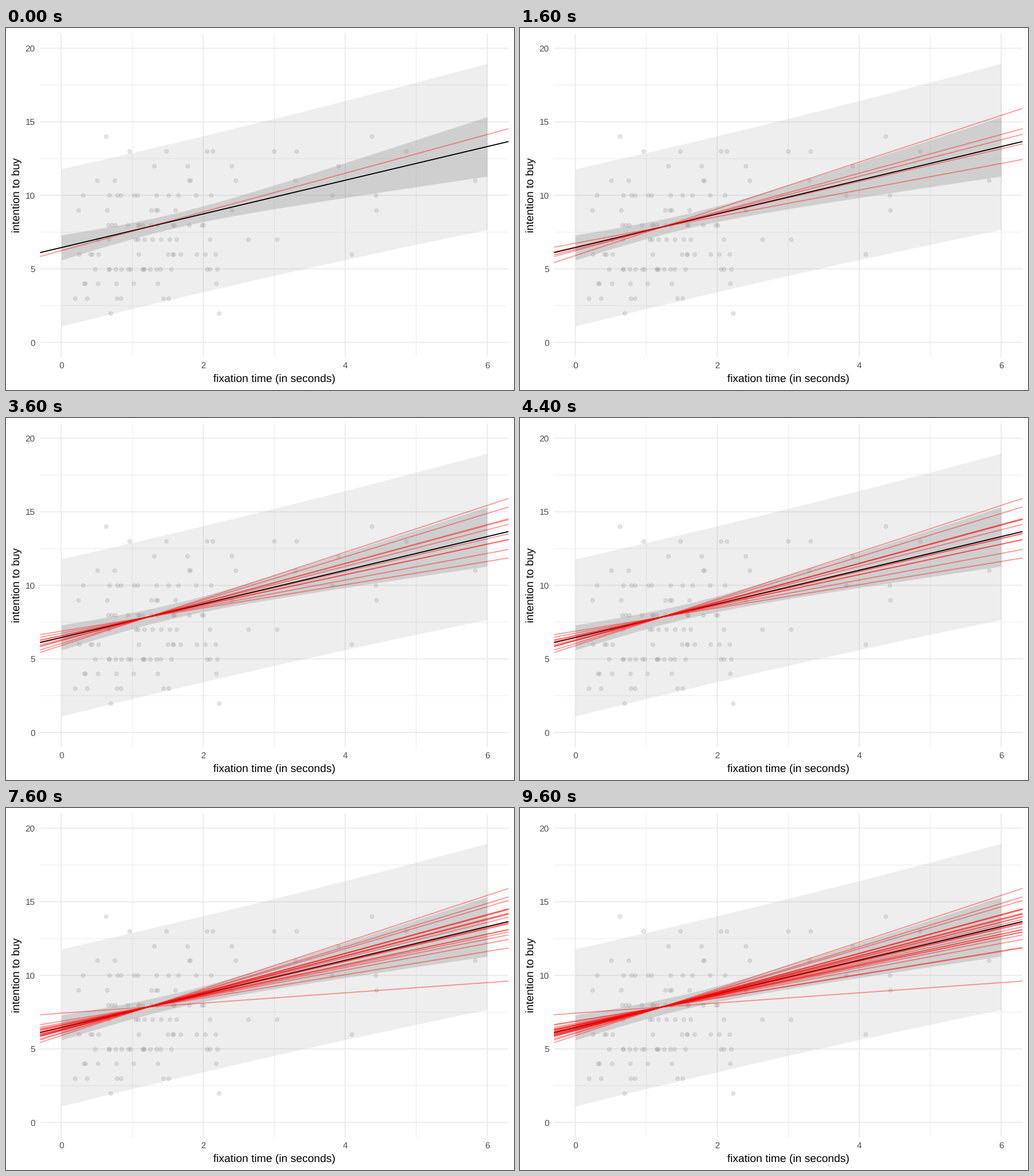
Recreate the animation shown at these times as a matplotlib script. Size 885x632 px, loop 10000 ms.

```python
import numpy as np
import matplotlib.pyplot as plt
from matplotlib.animation import FuncAnimation

W, H, DPI = 885, 632, 128
PT = 72 / DPI                     # one pixel in points
LEFT, RIGHT, TOP, BOTTOM = 59.3, 875.4, 9.7, 574.6
LINE = 1.86

plt.rcParams["font.family"] = "Liberation Sans"
plt.rcParams["text.hinting"] = "none"

fig = plt.figure(figsize=(W / DPI, H / DPI), dpi=DPI, facecolor="white")
ax = fig.add_axes([0, 0, 1, 1])
ax.set_xlim(0, W)
ax.set_ylim(H, 0)
ax.axis("off")


def px(x):
    return 96.4 + 123.65 * x


def py(y):
    return 548.95 - 25.68 * y


def fit(x):
    return 6.45 + 1.144 * x


def stroke(x, y, color, width=LINE, **kw):
    return ax.plot(x, y, color=color, lw=width * PT, snap=False,
                   solid_capstyle="butt", **kw)[0]


def across(y0, y1, color, **kw):
    """Line through the panel, from its left edge to its right edge."""
    return stroke([LEFT, RIGHT], [py(y0), py(y1)], color, **kw)


def label(x, y, text, size, color, ha="center", **kw):
    ax.text(x, y, text, fontsize=size * PT, color=color, ha=ha,
            va="baseline", **kw)


# grid: minor lines first, then major
for width, xs, ys in ((0.93, range(1, 6, 2), np.arange(2.5, 20, 5)),
                      (LINE, range(0, 7, 2), range(0, 21, 5))):
    for y in ys:
        across(y, y, "#ebebeb", width=width, zorder=1)
    for x in xs:
        stroke([px(x)] * 2, [TOP, BOTTOM], "#ebebeb", width, zorder=1)


# prediction and confidence bands
def band(base, alpha, z):
    x = np.linspace(0, 6, 121)
    half = np.sqrt(base ** 2 + 0.194 * (x - 1.56) ** 2)
    ax.fill_between(px(x), py(fit(x) - half), py(fit(x) + half),
                    color="#999999", alpha=alpha, lw=0, zorder=z)


band(5.3, 0.16, 2)
band(0.5, 0.365, 4)

# observations: a dense random cloud and a few long fixation times
rng = np.random.default_rng(7)
time = 2.9 * rng.beta(2, 2.5, 100)
score = np.clip(np.round(rng.normal(fit(time), 2.7)), 2, 14)
far = [(3.0, 13), (3.04, 7), (3.3, 11), (3.31, 13), (3.81, 10), (3.9, 12),
       (4.09, 6), (4.37, 14), (4.43, 10), (4.44, 9), (4.86, 13), (5.83, 11)]
for x, y in list(zip(time, score)) + far:
    ax.plot(px(x), py(y), "o", ms=6.8 * PT, mew=1.23 * PT, color="#999999",
            alpha=0.25, snap=False, zorder=3)

across(fit(-0.3), fit(6.3), "black", zorder=5)

# sampled lines: height at the right edge; steeper ones start lower
ends = [14.53, 15.91, 12.44, 13.5, 14.15, 13.11, 13.11, 11.86, 15.33,
        14.47, 13.54, 14.51, 9.61, 15.09, 14.19, 13.96, 12.75, 14.23,
        12.95, 13.61, 12.95, 13.8, 14.0, 11.9, 13.3]
lines = [across(fit(-0.3) - 0.3 * (end - fit(6.3)), end, "red",
                alpha=0.4, zorder=6) for end in ends]

# labels
for v in range(0, 21, 5):
    label(50.6, py(v) + 5.5, str(v), 15.36, "#4d4d4d", ha="right")
for v in range(0, 7, 2):
    label(px(v), 594.3, str(v), 15.36, "#4d4d4d")
label((LEFT + RIGHT) / 2, 617.8, "fixation time (in seconds)", 19.2, "black")
label(24.4, (TOP + BOTTOM) / 2, "intention to buy", 19.2, "black",
      rotation=90, rotation_mode="anchor")


def update(i):
    for k, line in enumerate(lines):
        line.set_visible(k <= i)
    return lines


anim = FuncAnimation(fig, update, frames=len(lines), interval=400,
                     repeat=True, repeat_delay=0, blit=False)
plt.show()
```
